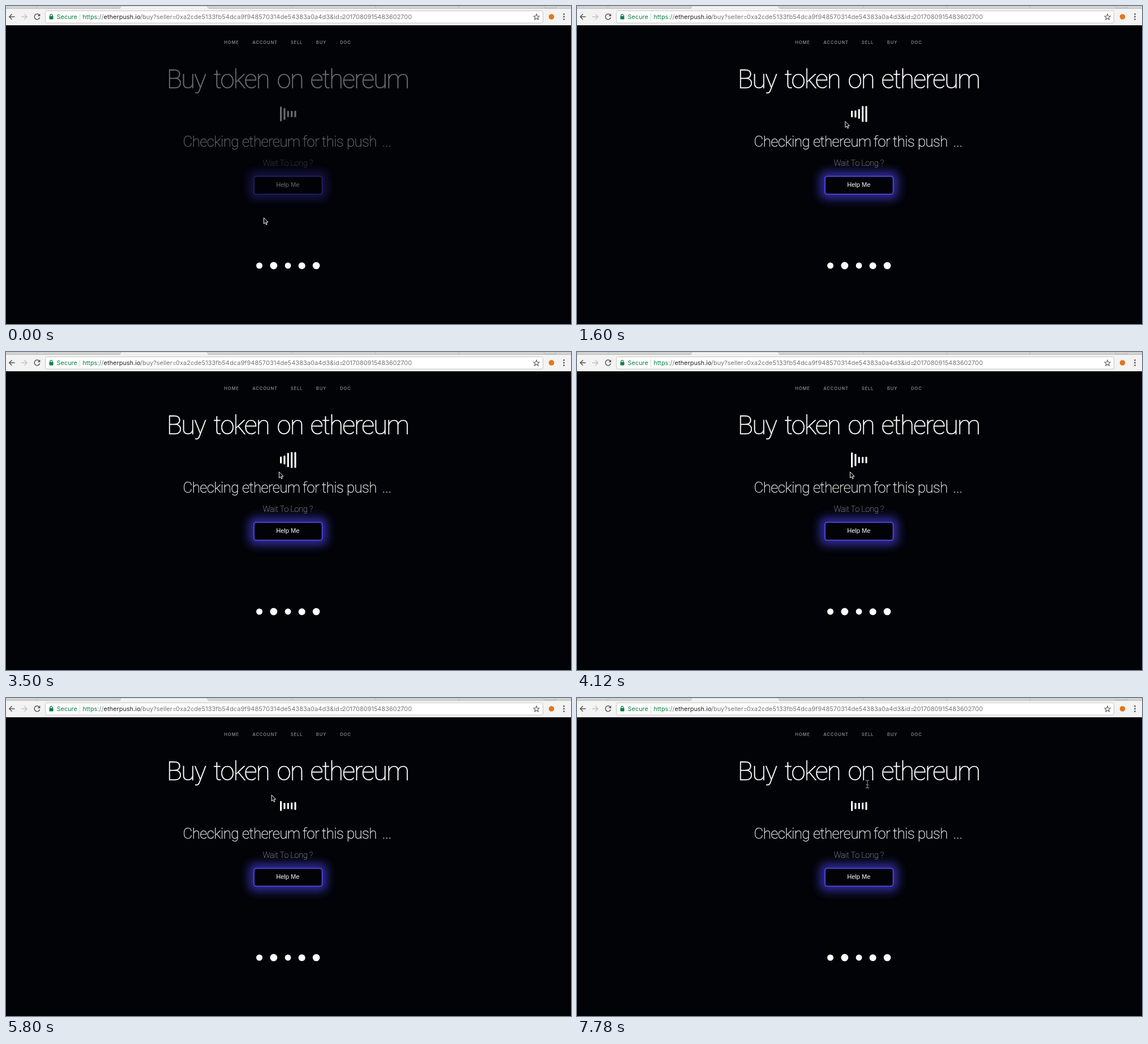
Recreate the animation shown at these times as an HTML page. Size 998 by 561 pixels, loop 8 s.

```html
<!DOCTYPE html>
<html lang="en">
<head>
<meta charset="utf-8">
<title>Buy token on ethereum</title>
<style>
  html, body { margin: 0; width: 100%; height: 100%; overflow: hidden; background: #020307; }
  svg { display: block; width: 100%; height: 100%; }
  text { white-space: pre; font-optical-sizing: none; }
  .ui { font: 400 10.95px Inter, sans-serif; fill: #757575; }
  .green { fill: #0b8043; }
  .nav { font: 600 7.6px Inter, sans-serif; letter-spacing: .85px; fill: #808184; }
  .thin { font-family: Roboto, sans-serif; font-weight: 100; text-anchor: middle; fill: #fff; stroke: #fff; }
  .title { font-size: 45.5px; letter-spacing: -1.9px; stroke-width: .65px; }
  .sub { font-size: 26px; letter-spacing: -.65px; stroke-width: .35px; }
  .wait { font-size: 14.5px; letter-spacing: -.25px; stroke-width: .2px; fill: #8a8a90; stroke: #8a8a90; }
  .help { font: 400 11.1px "Liberation Sans", Arial, sans-serif; text-anchor: middle; fill: #fff; }
</style>
</head>
<body>
<svg viewBox="0 0 998 561" xmlns="http://www.w3.org/2000/svg">
  <defs>
    <filter id="blur" x="-40%" y="-120%" width="180%" height="340%">
      <feGaussianBlur stdDeviation="8"/>
    </filter>
  </defs>
  <rect width="998" height="561" fill="#020307"/>

  <g id="browser">
    <rect width="998" height="34" fill="#f3f3f3"/>
    <rect width="998" height="4.5" fill="#d2d2d2"/>
    <path d="M0 4.5H201L203 0H355L358 4.5H998" fill="#f3f3f3" stroke="#b4b4b4" stroke-width=".8"/>
    <path d="M53 4.5L56 0M505 0L507 4.5M652 0L654 4.5M799 0L801 4.5M950 0L952 3.5H972L970 0" fill="none" stroke="#b4b4b4" stroke-width=".8"/>
    <rect x="69.5" y="8.5" width="879" height="21.5" rx="3" fill="#fff" stroke="#c6c6c6"/>
    <g fill="none" stroke-width="1.5">
      <path d="M15.5 19H6M10.5 14.3L5.8 19L10.5 23.7" stroke="#555"/>
      <path d="M27 19H36.7M32.3 14.3L37 19L32.3 23.7" stroke="#c4c4c4"/>
      <path d="M59 16.2A4.8 4.8 0 1 0 59.6 20.3" stroke="#555"/>
      <path d="M77.9 18.5V16.8A2.1 2.1 0 0 1 82.1 16.8V18.5" stroke="#0b8043" stroke-width="1.2"/>
    </g>
    <path d="M60.3 13.4V18H55.7Z" fill="#555"/>
    <rect x="76.5" y="17.7" width="7" height="5.8" rx=".8" class="green"/>
    <path d="M130.5 13V26" stroke="#d4d4d4"/>
    <text class="ui green" x="89.5" y="23.2">Secure</text>
    <text class="ui" y="23.2"><tspan class="green" x="135.3">https</tspan>://<tspan x="172.6" fill="#222">etherpush.io</tspan><tspan x="237">/buy?seller=</tspan><tspan x="300" letter-spacing=".08">0xa2cde5133fb54dca9f948570314de54383a0a4d3&amp;id=</tspan><tspan x="593.8">2017080915483602700</tspan></text>
    <path d="M937 14.2L938.4 17.7L942.1 18L939.3 20.4L940.2 24L937 22L933.8 24L934.7 20.4L931.9 18L935.6 17.7Z" fill="none" stroke="#5a5a5a" stroke-width="1.1"/>
    <circle cx="963.5" cy="19" r="4.8" fill="#e2761b"/>
    <g fill="#555"><circle cx="985.5" cy="14.4" r="1.4"/><circle cx="985.5" cy="19" r="1.4"/><circle cx="985.5" cy="23.6" r="1.4"/></g>
  </g>

  <text class="nav" y="67.3"><tspan x="385.3">HOME</tspan> <tspan x="435.3">ACCOUNT</tspan> <tspan x="502.7">SELL</tspan> <tspan x="547.8">BUY</tspan> <tspan x="590">DOC</tspan></text>

  <g id="page">
    <text class="thin title" y="145.3"><tspan x="317.9">Buy</tspan><tspan x="415.6">token</tspan><tspan x="501.6">on</tspan><tspan x="624.2">ethereum</tspan></text>
    <g id="bars" fill="#fff"></g>
    <text class="thin sub" y="247.6"><tspan x="361.7">Checking</tspan><tspan x="468.2">ethereum</tspan><tspan x="538.4">for</tspan><tspan x="576.9">this</tspan><tspan x="628.2">push</tspan><tspan x="672.8" letter-spacing="0">...</tspan></text>
    <text class="thin wait" x="497.6" y="282.4">Wait To Long ?</text>
    <rect x="429" y="291.5" width="138.5" height="49.5" rx="11" fill="#4640e0" opacity=".65" filter="url(#blur)"/>
    <rect x="438" y="300.5" width="120.5" height="31.5" rx="4" fill="#020307" stroke="#5b4cf6" stroke-width="1.6"/>
    <text class="help" x="497.8" y="318.7">Help Me</text>
  </g>

  <g id="links" fill="#fff">
    <circle cx="447.5" cy="458" r="5.5"/>
    <circle cx="472.8" cy="458" r="6.4"/>
    <circle cx="498" cy="458" r="5.4"/>
    <circle cx="522.6" cy="458.3" r="6"/>
    <circle cx="548" cy="458" r="6.3"/>
  </g>

  <path id="arrow" d="M.4 .6V11.2L2.8 9L4.5 12.8L6.2 12L4.6 8.3H7.9Z" fill="#000" stroke="#fff" stroke-linejoin="round"/>
  <path id="beam" d="M509.6 145Q512.6 145 512.9 147Q513.2 145 516.2 145M512.9 147V157M510.6 153H515.2M509.6 158.8Q512.6 158.8 512.9 156.8Q513.2 158.8 516.2 158.8" fill="none" stroke="#77787a" stroke-width="1.3"/>
</svg>
<script>
const LOOP = 8000;
const $ = id => document.getElementById(id);

// The screen refreshes in steps: section start, step length.
const paces = [[0, 200], [600, 250], [3500, 230], [5800, 247]];

// Turning points of the pointer: time, x, y.
const turns = [[0, 455, 373], [600, 520, 178.5], [1350, 563, 229], [1600, 473.5, 203],
  [1850, 507, 246], [2350, 445, 221], [2600, 482, 211], [4880, 482, 211], [5110, 449, 152],
  [5340, 519, 190], [5800, 468.7, 170.5], [6290, 452, 233], [6540, 425, 232], [7280, 426, 241], [7520, 505, 212]];

function refresh(time) {
  const [start, step] = paces.findLast(p => p[0] <= time);
  return start + Math.floor((time - start) / step) * step;
}

function pointerAt(t) {
  const i = turns.findLastIndex(k => k[0] <= t);
  const [t0, x0, y0] = turns[i];
  const [t1, x1, y1] = turns[i + 1] || [LOOP, x0, y0];
  const f = (t - t0) / (t1 - t0);
  return [x0 + (x1 - x0) * f, y0 + (y1 - y0) * f];
}

function bezier(x1, y1, x2, y2) {
  const at = (s, a, b) => 3 * (1 - s) * (1 - s) * s * a + 3 * (1 - s) * s * s * b + s * s * s;
  return x => {
    let lo = 0, hi = 1;
    for (let n = 0; n < 24; n++) {
      const mid = (lo + hi) / 2;
      if (at(mid, x1, x2) < x) lo = mid; else hi = mid;
    }
    return at(lo, y1, y2);
  };
}

const ease = bezier(.2, .68, .18, 1.08);

// Height factor over one cycle: drops to 0.4, then returns to 1.
function pulse(p) {
  p = (p % 1 + 1) % 1;
  return p < .5 ? 1 - .6 * ease(p * 2) : .4 + .6 * ease(p * 2 - 1);
}

const bars = Array.from({ length: 5 }, (_, i) => {
  const bar = document.createElementNS("http://www.w3.org/2000/svg", "rect");
  bar.setAttribute("x", 484 + i * 6.35);
  bar.setAttribute("width", 3.1);
  bar.setAttribute("rx", 1.2);
  $("bars").append(bar);
  return bar;
});

function draw(now) {
  const t = refresh(now % LOOP);

  $("page").setAttribute("opacity", 1 - .57 * Math.max(0, 1 - t / 1330) ** 1.67);

  bars.forEach((bar, i) => {
    const h = 28 * pulse((t * 1.0125 - 320 - i * 100) / 1000);
    bar.setAttribute("y", 190.5 - h / 2);
    bar.setAttribute("height", h);
  });

  const onText = t > 7700;
  $("arrow").setAttribute("visibility", onText ? "hidden" : "visible");
  $("beam").setAttribute("visibility", onText ? "visible" : "hidden");
  $("arrow").setAttribute("transform", `translate(${pointerAt(t)})`);
}

const start = performance.now();
function loop() {
  draw(Math.max(0, performance.now() - start));
  requestAnimationFrame(loop);
}
loop();
</script>
</body>
</html>
```
